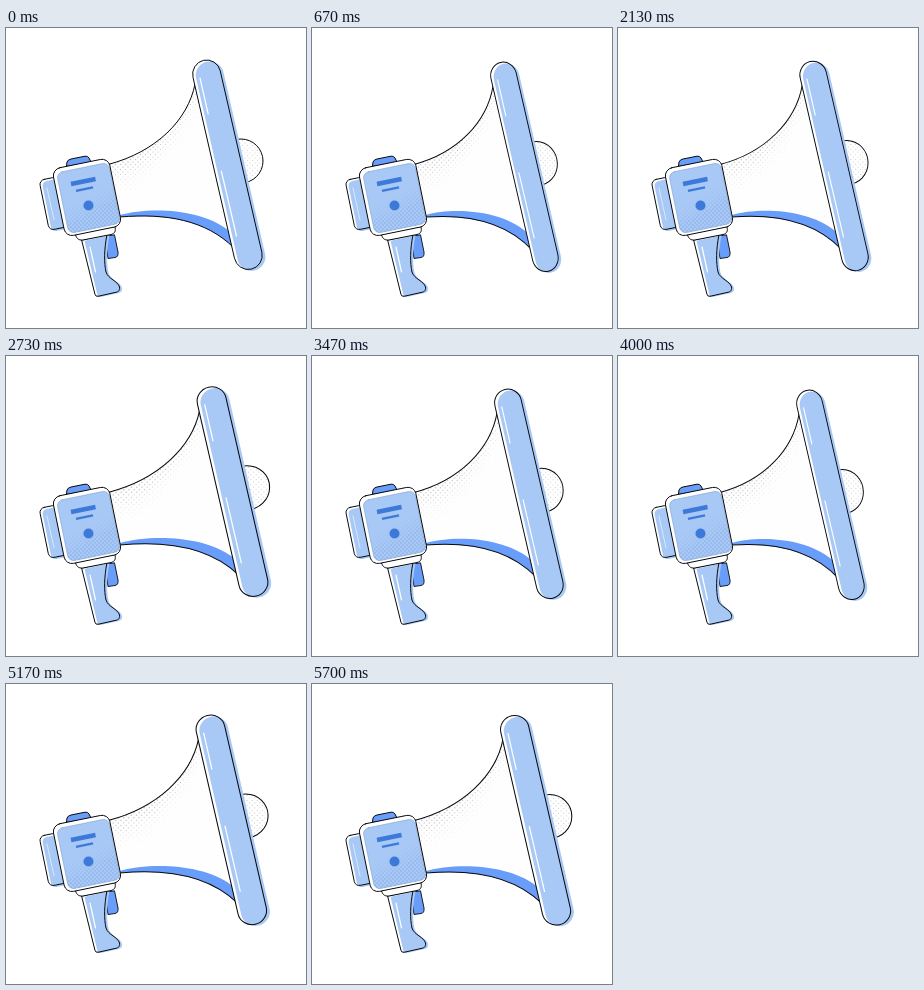
An HTML page with a canvas that plays this animation: 300x300 px, repeating every 5730 ms.

```html
<!DOCTYPE html>
<html lang="en">
<head>
<meta charset="utf-8">
<title>Megaphone</title>
<style>
html, body { margin: 0; width: 100%; height: 100%; overflow: hidden; background: #fff; }
canvas { display: block; width: 300px; height: 300px; }
</style>
</head>
<body>
<canvas id="stage"></canvas>
<script>
const LOOP = 5730, CYCLE = 12;
const INK = '#08090c', LIGHT = '#a8c8f5', MID = '#699dfa', DEEP = '#3c79d8';
const AXIS = -13 * Math.PI / 180, TILT = -11.5 * Math.PI / 180;
const PIVOT = { x: 105, y: 160 }, REACH = 155;

const canvas = document.getElementById('stage');
const ctx = canvas.getContext('2d');
const dpr = window.devicePixelRatio || 1;
canvas.width = canvas.height = 300 * dpr;

const horn = new Path2D('M102 136.5C150 124 182 92 189 56L228 220C200 192 160 186 114 189Z');
const hornTop = new Path2D('M102 136.5C150 124 182 92 189 56');
const hornLow = new Path2D('M114 189C160 185 200 192 228 220');
const band = new Path2D('M114 187C142 179 194 180 222 202L228 220C200 192 160 186 114 189Z');
const grip = new Path2D('M76 212L101 206.5C98 222 98 235 100 244C102 251 112 253 113.5 259C114 263 112 264 109 264.5L92 268.3Q89.5 268.7 89 266.5Z');
const collar = new Path2D('M69 205C70 210 72 212.5 77 212L105 206.5C109 205.5 110 203 109 199Z');
const trigger = new Path2D('M101 208L108.5 206.8L112 224Q112.6 229 109 229.5L102 230.5Q99.5 220 101 208Z');
const knob = new Path2D('M60.5 138L61 134Q62 131.5 65 131L79 128.2Q82 127.8 83 130L85 134Z');

function fill(path, color, dx = 0, dy = 0) {
  ctx.save();
  ctx.translate(dx, dy);
  ctx.fillStyle = color;
  ctx.fill(path);
  ctx.restore();
}

function stroke(path, color = INK, width = 1) {
  ctx.strokeStyle = color;
  ctx.lineWidth = width;
  ctx.stroke(path);
}

function line(x1, y1, x2, y2, color, width, cap = 'round') {
  ctx.lineCap = cap;
  const p = new Path2D();
  p.moveTo(x1, y1);
  p.lineTo(x2, y2);
  stroke(p, color, width);
}

function disc(x, y, r) {
  const p = new Path2D();
  p.arc(x, y, r, 0, Math.PI * 2);
  return p;
}

// Rounded box centred on a point and turned by TILT.
function box(x, y, w, h, r) {
  const flat = new Path2D();
  flat.roundRect(-w / 2, -h / 2, w, h, r);
  const p = new Path2D();
  p.addPath(flat, new DOMMatrix().translate(x, y).rotate(TILT * 180 / Math.PI));
  return p;
}

function capsule(x1, y1, x2, y2, r) {
  const a = Math.atan2(y2 - y1, x2 - x1), q = Math.PI / 2;
  const p = new Path2D();
  p.arc(x1, y1, r, a + q, a + 3 * q);
  p.arc(x2, y2, r, a - q, a + q);
  p.closePath();
  return p;
}

// Staggered dots clipped to a shape; size(x, y) gives each radius.
function dots(path, x0, y0, x1, y1, gap, color, size) {
  ctx.save();
  ctx.clip(path);
  ctx.fillStyle = color;
  for (let y = y0, row = 0; y < y1; y += gap / 2, row++) {
    for (let x = x0 + (row % 2) * gap / 2; x < x1; x += gap) {
      const r = size(x, y);
      if (r > 0.1) ctx.fill(disc(x, y, r));
    }
  }
  ctx.restore();
}

const rim = capsule(200.6, 46, 242.2, 227.5, 14);
const bump = disc(235, 133, 22);
const body = box(81, 169.4, 57.5, 69, 8);
const panel = box(82.6, 170, 53, 62, 6);
const back = box(47.5, 175.5, 19, 51, 5);

const ease = u => (1 - Math.cos(Math.PI * u)) / 2;
const keys = [[0, 0], [4, -12], [7, 7.4], [11, 0], [12, 0]];

function push(step) {
  const i = keys.findIndex(k => k[0] > step);
  const [a, from] = keys[i - 1], [b, to] = keys[i];
  const u = (step - a) / (b - a);
  // the return glides slowly away from its peak
  return from + (to - from) * (a === 7 ? u * u * (1.3 - 0.3 * u) : ease(u));
}

function drawHorn(offset) {
  ctx.save();
  ctx.translate(PIVOT.x, PIVOT.y);
  ctx.rotate(AXIS);
  ctx.scale(1 + offset / REACH, 1);
  ctx.rotate(-AXIS);
  ctx.translate(-PIVOT.x, -PIVOT.y);

  fill(bump, '#fff');
  dots(bump, 214, 110, 260, 157, 5, '#d0d0d4', () => 0.6);
  stroke(bump);

  fill(horn, '#fefefe');
  dots(horn, 102, 54, 212, 170, 5, '#c4c4c8', (x, y) => {
    const edge = 137 - 80 * Math.pow((x - 102) / 88, 2.1);
    const d = x > 190 ? (y - 55) * 0.8 : y - edge;
    return 0.75 * (1 - d / 38);
  });
  fill(band, MID);
  stroke(hornTop);
  stroke(hornLow);

  fill(rim, '#fff');
  fill(rim, LIGHT, 3.2, 1.3);
  line(194, 50, 202.2, 86, '#fff', 1.2);
  line(215.3, 143, 230.5, 208, '#fff', 1.2);
  stroke(rim);
  ctx.restore();
}

function drawBody() {
  fill(trigger, MID);
  stroke(trigger, INK, 0.9);

  fill(grip, '#fff');
  fill(grip, LIGHT, 2.5, 0.7);
  line(84, 219, 89.5, 244, '#fff', 1.2);
  stroke(grip);
  fill(collar, '#fff');
  stroke(collar);

  fill(back, '#fff');
  fill(back, LIGHT, 2.6, 1.5);
  line(41, 160, 48, 192, '#d9e8fd', 1);
  stroke(back);

  fill(knob, MID);
  stroke(knob);

  fill(body, '#fff');
  fill(panel, LIGHT);
  dots(panel, 55, 145, 118, 206, 4, '#7ea4de',
    (x, y) => Math.min(0.7, ((x - 60) * 0.55 + (y - 172)) / 42));
  stroke(panel, '#6f93c8', 0.5);
  stroke(body);

  line(65, 156, 89.5, 151.1, DEEP, 4.6, 'butt');
  line(70, 162.8, 87, 159.4, DEEP, 2.2, 'butt');
  fill(disc(82.5, 177.5, 5), DEEP);
}

function frame(now) {
  const t = now % LOOP;
  const tick = Math.floor((t + 4) * 0.03);        // 30 pictures a second
  const step = Math.floor(tick * 25 / 30) % CYCLE; // 25 poses a second
  ctx.setTransform(dpr, 0, 0, dpr, 0, 0);
  ctx.fillStyle = '#fff';
  ctx.fillRect(0, 0, 300, 300);
  ctx.lineJoin = 'round';
  drawHorn(push(step));
  drawBody();
}

const start = performance.now();
function loop() {
  frame(performance.now() - start);
  requestAnimationFrame(loop);
}
loop();
</script>
</body>
</html>
```
